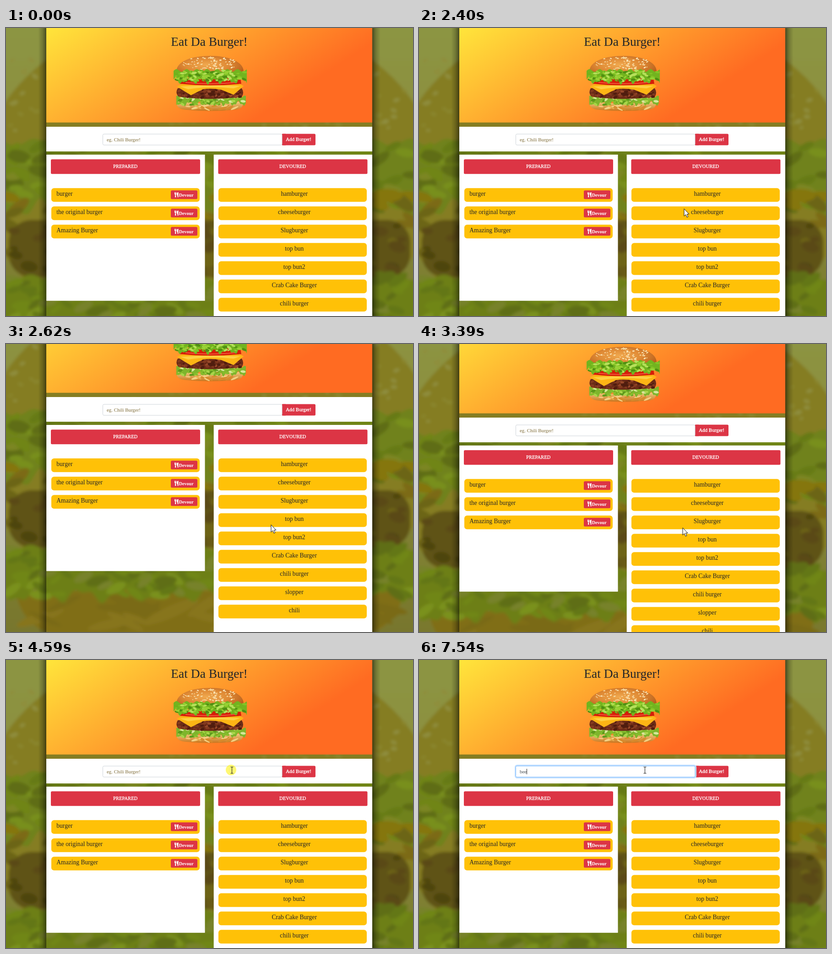
Write an HTML page that moves like this. It is 889 px wide and 630 px high and loops after 8000 ms.

```html
<!DOCTYPE html>
<html lang="en">
<head>
<meta charset="utf-8">
<title>Eat Da Burger!</title>
<style>
html, body { margin: 0; width: 100%; height: 100%; overflow: hidden; }
svg { display: block; width: 889px; height: 630px; background: #7d7c24; }
text { font: 13.57px "Liberation Serif", serif; fill: #212529; }
.mid { text-anchor: middle; }
.title { font-size: 27.5px; }
.head { font-size: 10.6px; fill: #fff; stroke: #fff; stroke-width: .3; }
.add { font-size: 11px; fill: #fff; stroke: #fff; stroke-width: .35; }
.devour { font-size: 10.1px; font-weight: bold; fill: #fff; }
.field { font-size: 10.9px; }
</style>
</head>
<body>
<svg id="stage" viewBox="0 0 889 630"></svg>
<script>
let seed = 7;
const rnd = (a = 0, b = 1) => {
  seed = (seed * 16807) % 2147483647;
  return a + (b - a) * seed / 2147483647;
};
const pick = list => list[Math.floor(rnd(0, list.length))];
const rect = (x, y, w, h, fill, r = 0) =>
  `<rect x="${x}" y="${y}" width="${w}" height="${h}" rx="${r}" fill="${fill}"/>`;
const label = (x, y, cls, s) => `<text x="${x}" y="${y}" class="${cls}">${s}</text>`;
const path = (d, fill, extra = '') => `<path d="${d}" fill="${fill}" ${extra}/>`;

// Random soft ellipses inside a box, optionally kept to an oval.
function blobs(n, x0, x1, y0, y1, rx, ry, colors, oval) {
  let out = '';
  for (let i = 0; i < n; i++) {
    const x = rnd(x0, x1), y = rnd(y0, y1), k = rnd(.6, 1.3), turn = rnd(-40, 40), c = pick(colors);
    const u = (2 * x - x0 - x1) / (x1 - x0), v = (2 * y - y0 - y1) / (y1 - y0);
    if (oval && u * u + v * v > 1) continue;
    out += `<ellipse rx="${(rx * k).toFixed(1)}" ry="${(ry * k).toFixed(1)}" fill="${c}"
      transform="translate(${x.toFixed(1)} ${y.toFixed(1)}) rotate(${turn.toFixed(0)})"/>`;
  }
  return out;
}

// A strip with frilly edges.
function frill(x0, x1, top, bottom, amp, len, fill) {
  const up = [], down = [];
  for (let i = 0; i <= 120; i++) {
    const x = x0 + (x1 - x0) * i / 120, a = x / len;
    up.push(`${x.toFixed(1)} ${(top + amp * .5 * Math.sin(a * 1.3)).toFixed(1)}`);
    down.unshift(`${x.toFixed(1)} ${(bottom + amp * (Math.sin(a) + .5 * Math.sin(a * 2.3 + 1))).toFixed(1)}`);
  }
  return path('M' + up.concat(down).join('L') + 'Z', fill);
}

const backdrop = () => `<g filter="url(#soft)">
  ${rect(-20, -20, 929, 780, 'url(#sky)')}
  <ellipse cx="444" cy="331" rx="500" ry="372" fill="#857d24"/>
  ${blobs(90, 10, 880, 70, 225, 7, 4, ['#8f8e3c', '#8a862f'])}
  ${frill(-20, 909, 250, 395, 16, 17, '#70821a')}
  ${blobs(150, -10, 900, 250, 400, 24, 10, ['#788f1c', '#667a14', '#6f8518', '#7c8624', '#5f6d12'])}
  ${blobs(45, -10, 900, 365, 430, 30, 12, ['#85760f', '#7b6a14', '#6c6515'])}
  ${rect(6, 420, 877, 125, '#5e5213', 50)}
  ${blobs(150, 10, 880, 422, 542, 15, 9, ['#5a4a12', '#685a18', '#4e4410', '#6d6419'])}
  ${path('M20 640H870Q850 735 760 738H130Q40 735 20 640Z', '#806e18')}
  ${blobs(30, 60, 830, 665, 725, 50, 10, ['#87751d', '#7a6b18'])}
  ${frill(-20, 909, 545, 650, 12, 15, '#6d7f18')}
  ${blobs(130, -10, 900, 545, 650, 22, 9, ['#7a911d', '#647714', '#708619', '#77822a', '#5f6e14'])}
</g>`;

const burger = () => `<g>
  ${path('M373 160Q446 170 517 160Q521 178 498 179Q446 184 394 179Q370 178 373 160Z', 'url(#base)')}
  ${blobs(14, 384, 508, 170, 177, 9, 2, ['#e9ad4e', '#d88a2b', '#f4cf82'])}
  ${frill(372, 524, 150, 165, 4, 3.4, '#7eb52c')}
  ${blobs(65, 376, 518, 152, 168, 4.5, 2.2, ['#a8d64a', '#5f9a1c', '#d7e69a', '#86bd2d'])}
  ${path('M375 132Q446 120 515 132Q521 142 515 150Q446 160 377 150Q369 142 375 132Z', '#6b2c17')}
  ${blobs(110, 378, 513, 131, 152, 4, 2.5, ['#82391f', '#501d0f', '#98492a', '#6a2815'])}
  ${path('M373 128L388 121H508L519 127L497 146L470 135Q448 131 430 134L404 147Z', '#fdb515')}
  ${path('M380 128Q446 123 512 127L497 132Q446 126 398 134Z', '#ffd043')}
  ${path('M382 110Q446 103 512 110L514 122Q446 129 380 122Z', '#d51e09')}
  ${path('M392 119Q446 125 503 119', 'none', 'stroke="#f2573a" stroke-width="2"')}
  ${path('M372 98C370 73 405 61 446 61S521 74 519 98Q500 106 446 105T372 98Z', 'url(#bun)')}
  ${blobs(95, 382, 509, 64, 92, 2.1, 1.1, ['#fde8bb', '#f7d79c'], true)}
  ${frill(366, 526, 93, 115, 6, 4.6, '#72b41f')}
  ${blobs(95, 370, 522, 94, 115, 5, 2.3, ['#96d033', '#4f8f12', '#b5e05a', '#70b31c', '#82c426'])}
</g>`;

const icon = y => `<g transform="translate(368 ${y})" fill="#fff">
  <path d="M0 0H1V3H1.5V0H2.5V3H3V0H4V4L3 5.5L3.6 11H1L1.4 5.5L0 4Z"/>
  <path d="M5 2Q6 0 8.6 0V11H6.6V7H5Z"/></g>`;

const prepared = ['burger', 'the original burger', 'Amazing Burger'];
const devoured = ['hamburger', 'cheeseburger', 'Slugburger', 'top bun', 'top bun2',
  'Crab Cake Burger', 'chili burger', 'slopper', 'chili'];
const red = '#dc3545', amber = '#ffc107';

const panel = (x, h, name) =>
  rect(x, 277, 346.3, h, '#fff') + rect(x + 9.8, 287.3, 326, 32, red, 2.5) +
  label(x + 172.5, 306.3, 'head mid', name);
const left = (s, i) => {
  const y = 350.3 + i * 40;
  return rect(99, y, 324, 30, amber, 6) + label(110.3, y + 16.7, '', s) +
    rect(360, y + 5, 58, 19, red, 2.5) + icon(y + 9) + label(377.7, y + 18.5, 'devour', 'Devour');
};
const right = (s, i) => {
  const y = 350.3 + i * 40;
  return rect(464, y, 324, 30, amber, 6) + label(629.7, y + 16.7, 'mid', s);
};
const fade = (id, x1, x2) => `<linearGradient id="${id}" x1="${x1}" x2="${x2}">
  <stop stop-opacity=".5"/><stop offset=".45" stop-opacity=".2"/><stop offset="1" stop-opacity="0"/></linearGradient>`;

document.getElementById('stage').innerHTML = `<defs>
  <filter id="soft" x="-5%" y="-5%" width="110%" height="110%"><feGaussianBlur stdDeviation="3"/></filter>
  <linearGradient id="sky" x2="0" y2="1"><stop stop-color="#8c9644"/><stop offset=".2" stop-color="#8c9140"/>
    <stop offset="1" stop-color="#77752c"/></linearGradient>
  <linearGradient id="hot" gradientUnits="userSpaceOnUse" x1="291" y1="-132" x2="517.5" y2="216.7">
    <stop stop-color="#ffe53b"/><stop offset="1" stop-color="#ff6b22"/></linearGradient>
  <radialGradient id="bun" cx=".45" cy=".45" r=".6"><stop stop-color="#f0a94f"/>
    <stop offset=".55" stop-color="#df8a35"/><stop offset="1" stop-color="#b9601d"/></radialGradient>
  <linearGradient id="base" x2="0" y2="1"><stop stop-color="#f3cf85"/><stop offset="1" stop-color="#c9751f"/></linearGradient>
  ${fade('shadeL', 1, 0)}${fade('shadeR', 0, 1)}
</defs>
<g id="page">
  ${backdrop()}
  ${rect(70, -10, 18, 770, 'url(#shadeL)')}${rect(800, -10, 18, 770, 'url(#shadeR)')}
  ${rect(88, 0, 712, 206.7, 'url(#hot)')}
  ${label(444, 39, 'title mid', 'Eat Da Burger!')}
  ${burger()}
  ${rect(88, 216, 712, 54, '#fff')}
  ${rect(603, 231.5, 73, 25, red, 2.5)}${rect(603, 231.5, 8, 25, red)}
  ${label(639, 247, 'add mid', 'Add Burger!')}
  <rect id="glow" x="210.5" y="230.5" width="394" height="27" rx="4" fill="none" stroke="#bfdeff" stroke-width="3"/>
  <rect id="box" x="211.5" y="232" width="391.5" height="24" rx="2.5" fill="#fff"/>
  <text id="field" class="field" x="220" y="247.7"></text>
  <rect id="caret" y="238" width="1" height="12" fill="#222"/>
  ${panel(88.2, 319.7, 'PREPARED')}${panel(453.7, 480, 'DEVOURED')}
  ${prepared.map(left).join('')}${devoured.map(right).join('')}
</g>
<circle id="click" cx="491.5" cy="240.5" r="11.5" fill="#fff200"/>
<g id="pointer">
  <path id="arrow" d="M0 0V16L3.7 12.6L6.2 18.5L8.8 17.4L6.4 11.6H11Z" fill="#fff" stroke="#111"/>
  <path id="beam" d="M-3 -7H-1L0 -6L1 -7H3M0 -6V6M-3 7H-1L0 6L1 7H3" fill="none" stroke="#222" stroke-width="1.1"/>
</g>`;

// Each move: first step, last step, number of steps, end point.
const moves = [
  [420, 1190, 8, 741, 401], [1290, 1620, 4, 733, 402], [1840, 2400, 6, 579, 395.5],
  [2740, 2950, 3, 576, 401], [3170, 3170, 1, 576, 402], [3500, 4060, 6, 496, 238],
  [4370, 4370, 1, 493.5, 241]
];
function pointerAt(t) {
  let x = 888, y = 622;
  for (const [t0, t1, n, ex, ey] of moves) {
    if (t < t0) break;
    const step = t1 > t0 ? Math.floor((t - t0) / (t1 - t0) * (n - 1) + .01) + 1 : 1;
    const p = Math.min(1, step / n), e = p * p * (3 - 2 * p);
    x += (ex - x) * e;
    y += (ey - y) * e;
  }
  return [x, y];
}

// Value of the last [time, value] entry that has been reached.
const at = (t, list) => list.reduce((v, [s, w]) => t >= s ? w : v, list[0][1]);
const scrollSteps = [[0, 0], [2520, 34.6], [2620, 100], [3390, 55], [3500, 0]];
const typing = [[0, ''], [6450, 'b'], [7330, 'be'], [7540, 'bee']];
const blink = [[0, 0], [4810, 1], [5370, 0], [5910, 1], [7000, 0], [7330, 1]];
const focus = [[0, 0], [4810, .6], [4920, 1]];
const press = [[0, 0], [4590, .55], [4700, .5], [4810, .25], [4920, 0]];

const el = id => document.getElementById(id);
const set = (id, name, value) => el(id).setAttribute(name, value);

function draw(now) {
  const t = now % 8000, word = at(t, typing), lit = at(t, focus), [x, y] = pointerAt(t);
  const overField = y > 231 && y < 257 && x > 211 && x < 603;
  set('page', 'transform', `translate(0 ${-at(t, scrollSteps)})`);
  set('glow', 'opacity', lit);
  set('box', 'stroke', lit ? '#80bdff' : '#ced4da');
  el('field').textContent = word || 'eg. Chili Burger!';
  el('field').style.fill = word ? '#495057' : '#7d6a35';
  set('caret', 'x', word ? Math.round(219.6 + el('field').getComputedTextLength()) : 220);
  set('caret', 'opacity', at(t, blink));
  set('click', 'opacity', at(t, press));
  set('pointer', 'transform', `translate(${x} ${y})`);
  set('arrow', 'opacity', t >= 420 && !overField ? 1 : 0);
  set('beam', 'opacity', overField ? 1 : 0);
  requestAnimationFrame(draw);
}
draw(0);
</script>
</body>
</html>
```
